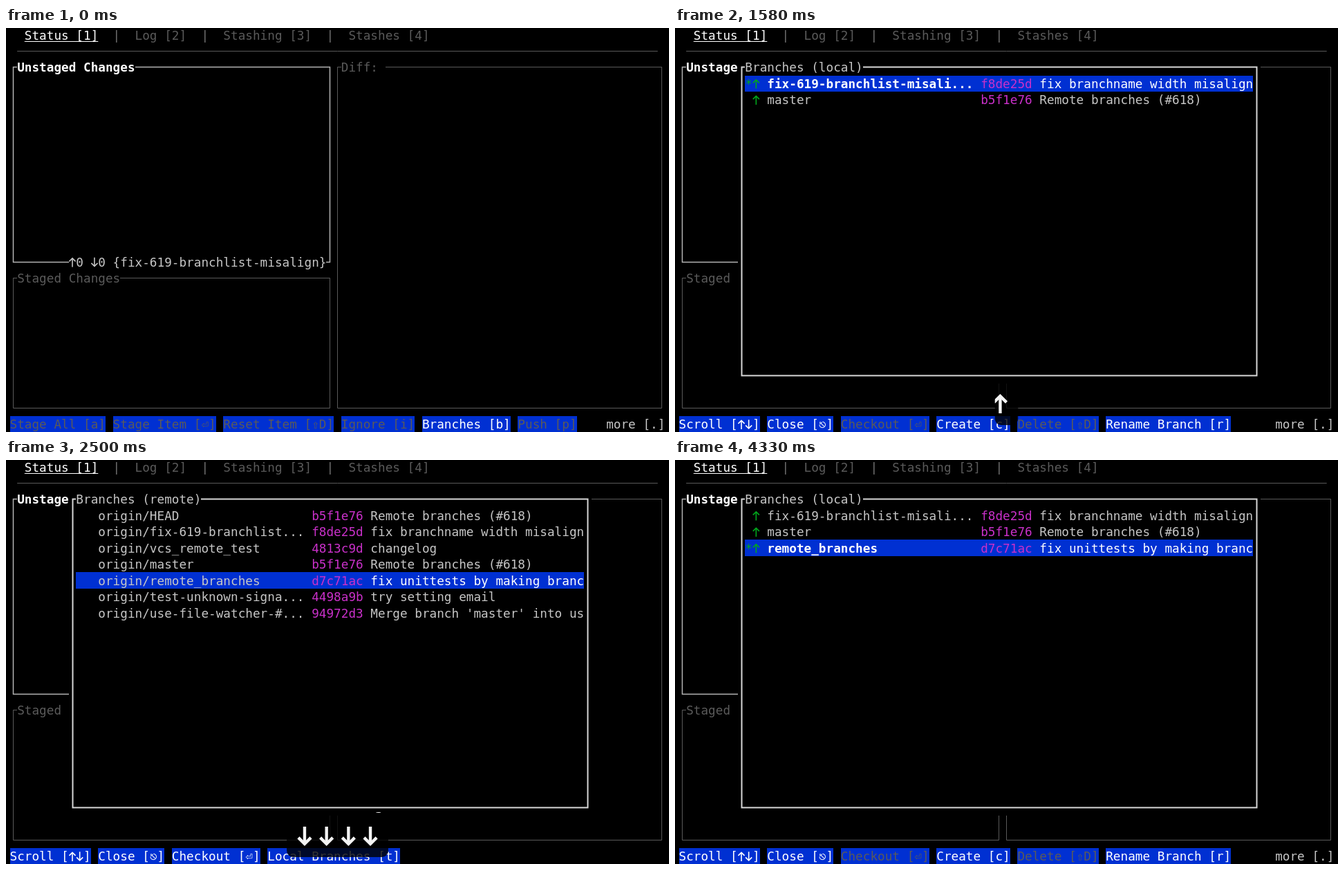
Recreate the animation shown at these times as an HTML page with a canvas. Size 959 by 584 pixels, loop 4430 ms.

```html
<!DOCTYPE html>
<html lang="en">
<head>
<meta charset="utf-8">
<title>Branch list</title>
<style>
html, body { margin: 0; width: 100%; height: 100%; overflow: hidden; background: #000; }
canvas { display: block; }
</style>
</head>
<body>
<canvas id="stage" width="959" height="584"></canvas>
<script>
const ctx = document.getElementById('stage').getContext('2d');
const LOOP = 4430, STEP = 250 / 3;
const CELL_W = 10.65, CELL_H = 23.45, LEFT = 5.5;
const MONO = '17.68px "DejaVu Sans Mono", "DejaVu Sans", "Noto Sans Mono", monospace';
const WHITE = '#ffffff', LIGHT = '#c6c6c6', DIM = '#5a5a5a', BLUE = '#0030d2';
const GREEN = '#00a81c', MAGENTA = '#c930c9';

const colX = c => LEFT + c * CELL_W;
const rowTop = r => r * CELL_H - 1.8;
const midX = c => Math.floor(colX(c + 0.5)) + 0.5;
const midY = r => Math.floor(r * CELL_H + 10) + 0.5;
const isArrow = ch => ch === '↑' || ch === '↓';

function line(points, color, width) {
  ctx.strokeStyle = color;
  ctx.lineWidth = width;
  ctx.beginPath();
  points.forEach(([x, y]) => ctx.lineTo(x, y));
  ctx.stroke();
}

// Arrow centred on x, y; size is half its height.
function arrow(ch, x, y, size, color, width) {
  ctx.save();
  ctx.translate(x, y);
  if (ch === '↓') ctx.scale(1, -1);
  const wing = size * 0.67, tip = 0.85 * size;
  line([[0, size], [0, -tip]], color, width);
  line([[-wing, wing - tip], [0, -tip], [wing, wing - tip]], color, width);
  ctx.restore();
}

// Each character sits in its own terminal cell.
function print(text, col, row, color, bold) {
  ctx.font = (bold ? 'bold ' : '') + MONO;
  ctx.fillStyle = color;
  ctx.textAlign = 'center';
  [...text].forEach((ch, i) => {
    const x = colX(col + i + 0.5), y = row * CELL_H + 16.5;
    if (isArrow(ch)) arrow(ch, x, y - 6.2, 6.8, color, 1.6);
    else if (ch !== ' ') ctx.fillText(ch, x, y);
  });
}

function fillCells(col, row, cols, rows, color) {
  ctx.fillStyle = color;
  const x = Math.round(colX(col)), y = Math.round(rowTop(row));
  ctx.fillRect(x, y, Math.round(colX(col + cols)) - x, Math.round(rowTop(row + rows)) - y);
}

function box(c0, r0, c1, r1, color, width, title, titleColor, bold) {
  const x0 = midX(c0), x1 = midX(c1), y0 = midY(r0), y1 = midY(r1);
  line([[x0, y0], [x1, y0], [x1, y1], [x0, y1], [x0, y0], [x1, y0]], color, width);
  fillCells(c0 + 1, r0, title.length, 1, '#000');
  print(title, c0 + 1, r0, titleColor, bold);
}

// Footer entries: a leading "-" marks a disabled command.
function footer(entries) {
  let col = 0;
  for (const entry of entries) {
    const off = entry[0] === '-';
    const text = off ? entry.slice(1) : entry;
    fillCells(col, 24, text.length, 1, BLUE);
    print(text, col, 24, off ? DIM : WHITE);
    col += text.length + 1;
  }
}

const FOOT = {
  status: ['-Stage All [a]', '-Stage Item [⏎]', '-Reset Item [⇧D]', '-Ignore [i]', 'Branches [b]', '-Push [p]'],
  local: ['Scroll [↑↓]', 'Close [⎋]', '-Checkout [⏎]', 'Create [c]', '-Delete [⇧D]', 'Rename Branch [r]'],
  remote: ['Scroll [↑↓]', 'Close [⎋]', 'Checkout [⏎]', 'Local Branches [t]']
};

const FIX = ['f8de25d', 'fix branchname width misalign'];
const MASTER = ['b5f1e76', 'Remote branches (#618)'];
const TESTS = ['d7c71ac', 'fix unittests by making branc'];
const LOCAL = [
  ['fix-619-branchlist-misali...', ...FIX],
  ['master', ...MASTER],
  ['remote_branches', ...TESTS]
];
const REMOTE = [
  ['origin/HEAD', ...MASTER],
  ['origin/fix-619-branchlist...', ...FIX],
  ['origin/vcs_remote_test', '4813c9d', 'changelog'],
  ['origin/master', ...MASTER],
  ['origin/remote_branches', ...TESTS],
  ['origin/test-unknown-signa...', '4498a9b', 'try setting email'],
  ['origin/use-file-watcher-#...', '94972d3', "Merge branch 'master' into us"]
];

function statusScreen() {
  const tabs = [[14, '|'], [17, 'Log [2]'], [26, '|'], [29, 'Stashing [3]'], [43, '|'], [46, 'Stashes [4]']];
  print('Status [1]', 2, 0, WHITE);
  line([[colX(2), 19.5], [colX(12), 19.5]], WHITE, 1);
  tabs.forEach(([col, text]) => print(text, col, 0, text === '|' ? '#707070' : DIM));
  line([[colX(1), midY(1)], [colX(88), midY(1)]], DIM, 1);

  box(0, 2, 43, 14, '#b4b4b4', 1.5, 'Unstaged Changes', WHITE, true);
  const state = '↑0 ↓0 {fix-619-branchlist-misalign}';
  fillCells(8, 14, state.length, 1, '#000');
  print(state, 8, 14, LIGHT);
  box(0, 15, 43, 23, DIM, 1, 'Staged Changes', DIM);
  box(44, 2, 88, 23, DIM, 1, 'Diff: ', DIM);
}

function popup(kind, rows, selected, head) {
  fillCells(8, 2, 71, 20, '#000');
  box(8, 2, 78, 21, '#d8d8d8', 2, `Branches (${kind})`, LIGHT);
  rows.forEach(([name, hash, message], i) => {
    const row = 3 + i, on = i === selected, isHead = i === head;
    if (on) fillCells(9, row, 40 + message.length, 1, BLUE);
    if (isHead) print('*', 9, row, GREEN);
    if (kind === 'local') print('↑', 10, row, GREEN);
    print(name, 12, row, isHead ? WHITE : LIGHT, isHead);
    print(hash, 41, row, MAGENTA);
    print(message, 49, row, on ? WHITE : LIGHT);
  });
}

// Pressed keys: each entry is one line, each key has the step it was pressed at.
const KEY_LINES = [
  [['b', 2]],
  [['↑', 10]],
  [['t', 19]],
  [['↓', 25], ['↓', 27], ['↓', 28], ['↓', 30], ['↓', 31], ['↑', 36], ['↩', 39]]
];
const KEY_FONT = 'bold 37px Inter, "Open Sans", sans-serif';
const CENTER = 479.5, LINE = 45;

function keyWidth(key) {
  if (key === '↩') return 36;
  if (isArrow(key)) return 31.7;
  ctx.font = KEY_FONT;
  return ctx.measureText(key).width;
}

const lineWidth = keys => keys.reduce((sum, [key]) => sum + keyWidth(key), 0);

function drawKey(key, x, dy) {
  const w = keyWidth(key), color = '#f4f4f4';
  ctx.save();
  ctx.translate(x + w / 2, 543.5 + dy);
  if (isArrow(key)) {
    arrow(key, 0, 0, 13.5, color, 4.4);
  } else if (key === '↩') {
    line([[-7, -12], [-14, -3.5], [-7, 5]], color, 4);
    ctx.beginPath();
    ctx.moveTo(-13, -3.5);
    ctx.lineTo(8, -3.5);
    ctx.arc(8, -9.5, 6, Math.PI / 2, -Math.PI / 2, true);
    ctx.lineTo(2, -15.5);
    ctx.stroke();
  } else {
    ctx.font = KEY_FONT;
    ctx.fillStyle = color;
    ctx.textAlign = 'left';
    ctx.fillText(key, -w / 2, 10.5);
  }
  ctx.restore();
}

function drawLine(keys, right, dy) {
  let x = right - lineWidth(keys);
  for (const [key] of keys) {
    drawKey(key, x, dy);
    x += keyWidth(key);
  }
}

function keyOverlay(step) {
  const lines = KEY_LINES.map(l => l.filter(([, at]) => at <= step)).filter(l => l.length);
  const alpha = step < 50 ? 1 : (52 - step) / 3;
  if (!lines.length || alpha <= 0) return;

  const now = lines[lines.length - 1], before = lines[lines.length - 2];
  const age = step - now[0][1];
  const idle = step - now[now.length - 1][1];
  const rise = LINE * (1 - 0.42 ** age);
  const half = lineWidth(now) / 2;

  ctx.save();
  ctx.globalAlpha = alpha;
  ctx.fillStyle = 'rgba(0,0,0,0.8)';
  ctx.beginPath();
  ctx.roundRect(CENTER - half - 10, 509, 2 * half + 20, 65, 9);
  ctx.fill();
  ctx.beginPath();
  ctx.rect(CENTER - half - 10, 509, 2 * half + 20, 65);
  ctx.clip();
  if (before && age < 10 && idle < 3) drawLine(before, CENTER + half, -rise);
  drawLine(now, CENTER + half, age < 2 ? LINE - rise : 0);
  ctx.restore();
}

// Steps at which the remote selection changes, with its new index.
const MOVES = [[20, 0], [26, 1], [27, 2], [29, 3], [30, 4], [32, 5], [36, 4]];

function draw(time) {
  // Steps are cut to whole hundredths of a second, so they begin slightly early.
  const step = Math.floor((time % LOOP + 14) / STEP);
  ctx.fillStyle = '#000';
  ctx.fillRect(0, 0, 959, 584);
  statusScreen();

  const remote = step >= 20 && step < 40;
  if (step < 3) {
    footer(FOOT.status);
  } else if (remote) {
    const selected = MOVES.filter(([at]) => at <= step).pop()[1];
    popup('remote', REMOTE, selected, -1);
    footer(FOOT.remote);
  } else {
    const head = step < 20 ? 0 : 2;
    popup('local', head ? LOCAL : LOCAL.slice(0, 2), head, head);
    footer(FOOT.local);
  }
  if (!remote) print('more [.]', 81, 24, LIGHT);
  keyOverlay(step);
}

const start = performance.now();
function tick() {
  draw(performance.now() - start);
  requestAnimationFrame(tick);
}
tick();
</script>
</body>
</html>
```
